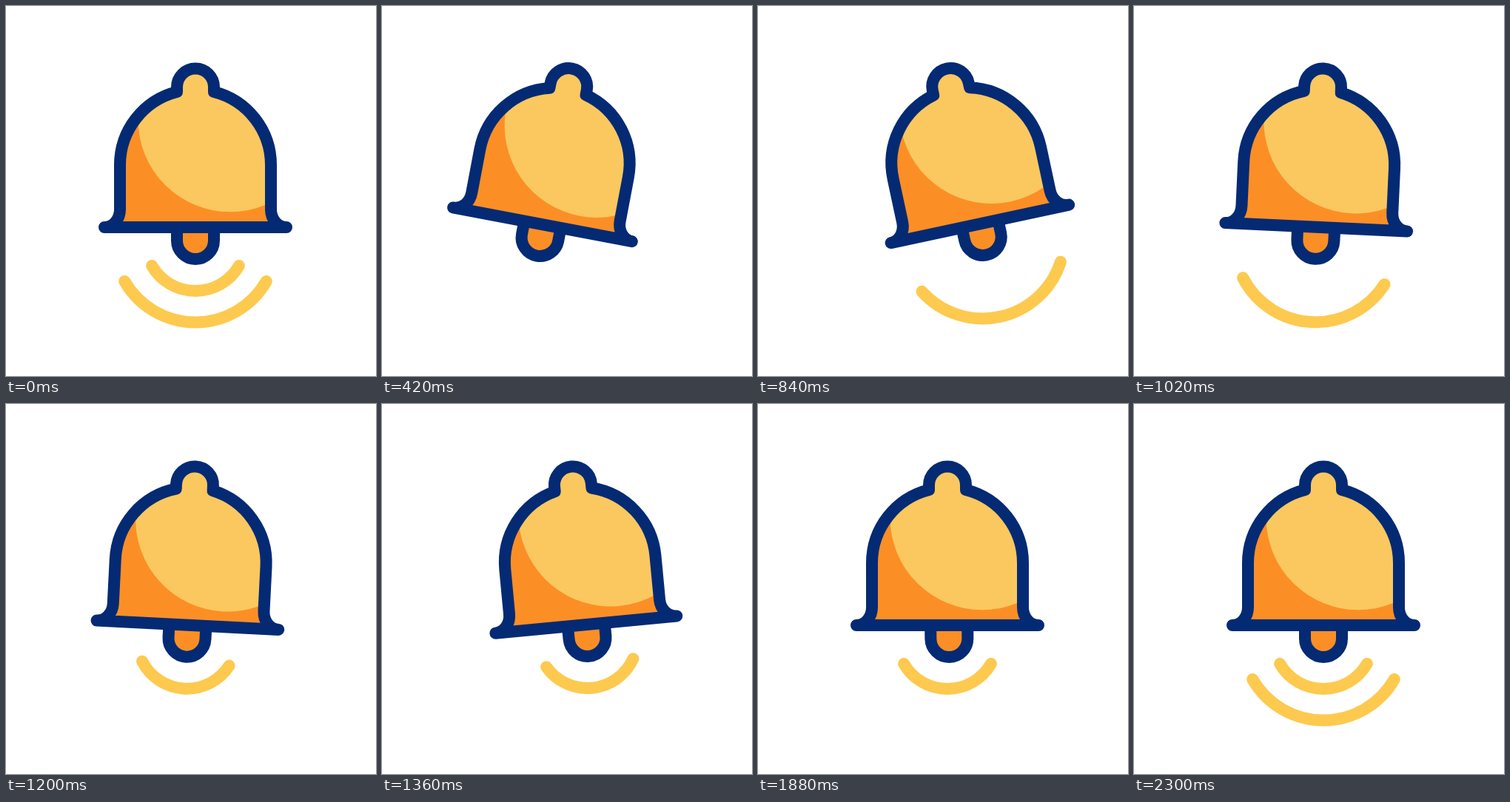
An HTML page that plays this animation: 500x500 px, repeating every 2400 ms.

```html
<!DOCTYPE html>
<html lang="en">
<head>
<meta charset="utf-8">
<title>Ringing bell</title>
<style>
  html, body { margin: 0; width: 100%; height: 100%; overflow: hidden; background: #fff; }
  svg { display: block; width: 100%; height: 100%; }
  .line { stroke: #042a74; stroke-width: 16; stroke-linecap: round; stroke-linejoin: round; }
  .wave { fill: none; stroke: #fdca4f; stroke-width: 16; stroke-linecap: round; }
</style>
</head>
<body>
<svg viewBox="0 0 500 500">
  <defs>
    <path id="body" d="M154 299V215A102 102 0 0 1 231 116V109.5A25 25 0 0 1 281 109.5V116A102 102 0 0 1 358 215V299Z"/>
    <clipPath id="inside"><use href="#body"/></clipPath>
  </defs>
  <g id="waves">
    <path id="inner" class="wave" d="M197.1 351A68 68 0 0 0 314.9 351"/>
    <path id="outer" class="wave" d="M160.2 372A110.5 110.5 0 0 0 351.8 372"/>
  </g>
  <path id="clapper" class="line" fill="#fb8f26" d="M231 299V317A25 25 0 0 0 281 317V299"/>
  <g id="bell">
    <use href="#body" fill="#fb8f26"/>
    <circle cx="303" cy="153.8" r="124.5" fill="#fac85e" clip-path="url(#inside)"/>
    <path class="line" fill="none" d="M133 299A21 24 0 0 0 154 275V215A102 102 0 0 1 231 116V109.5A25 25 0 0 1 281 109.5V116A102 102 0 0 1 358 215V275A21 24 0 0 0 379 299Z"/>
  </g>
</svg>
<script>
  const LOOP = 2400, START = 200, SWING = 300, END = 2300;
  const bellAngles = [0, 13, -13, 6, -6, 0];
  const clapperAngles = [0, 13, -13, 6, -6, 2, -2, 0];
  const part = id => document.getElementById(id);
  const bell = part('bell'), clapper = part('clapper'), waves = part('waves');
  const inner = part('inner'), outer = part('outer');

  // Eased swing from one extreme to the next
  function angleAt(angles, t) {
    const s = Math.max(0, (t - START) / SWING), i = Math.floor(s), p = s - i;
    const from = angles[i] ?? 0, to = angles[i + 1] ?? 0;
    return from + (to - from) * p * p * (3 - 2 * p);
  }

  const rotate = (node, angle) => node.setAttribute('transform', `rotate(${angle} 256 89)`);
  const show = (node, on) => node.setAttribute('visibility', on ? 'visible' : 'hidden');

  function draw(now) {
    const t = Math.floor(now % LOOP / 20) * 20;
    const angle = angleAt(bellAngles, t);
    rotate(bell, angle);
    rotate(waves, angle);
    rotate(clapper, angleAt(clapperAngles, t));

    // The waves take turns, one per swing, after a silent first swing
    const rest = t <= START || t >= END;
    const swing = Math.floor((t - START) / SWING);
    show(inner, rest || swing % 2 === 1);
    show(outer, rest || (swing > 0 && swing % 2 === 0));
  }

  const begin = performance.now();
  function tick() {
    draw(performance.now() - begin);
    requestAnimationFrame(tick);
  }
  tick();
</script>
</body>
</html>
```
